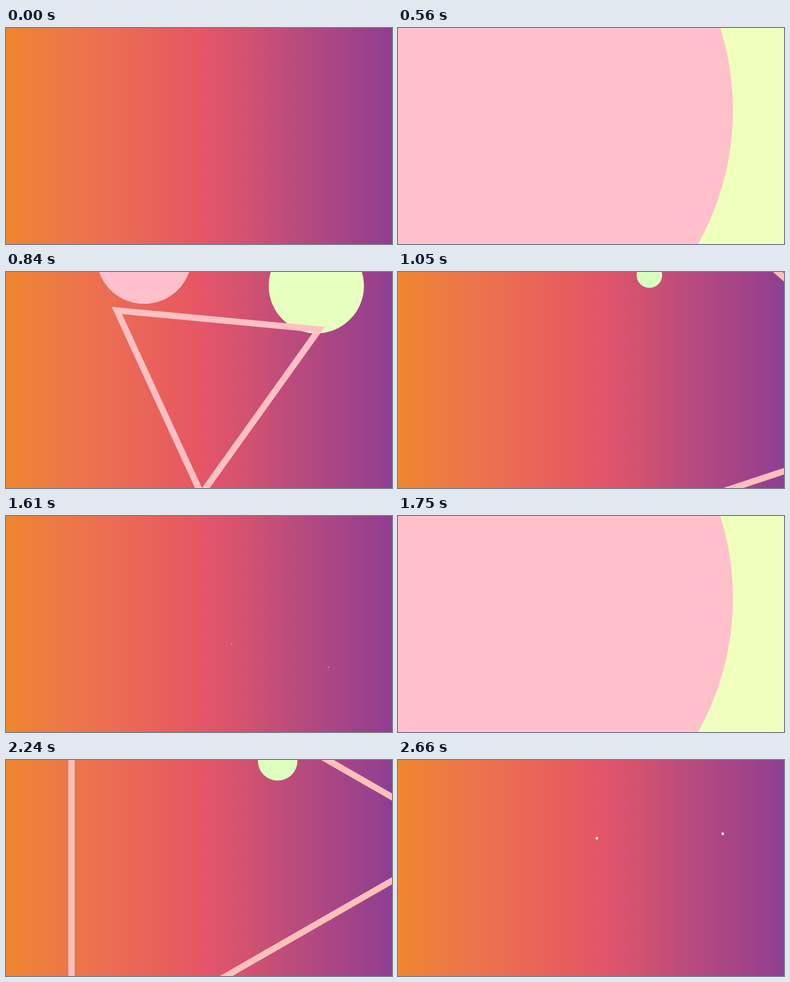
An HTML page with a canvas for the animation above (2730 ms loop, 640x360 px).

```html
<!DOCTYPE html>
<html lang="en">
<head>
<meta charset="utf-8">
<title>Burst</title>
<style>
  html, body { margin: 0; width: 100%; height: 100%; overflow: hidden; }
  canvas { display: block; width: 100vw; height: 100vh; }
</style>
</head>
<body>
<canvas id="stage" width="640" height="360"></canvas>
<script>
const W = 640, H = 360, LOOP = 2730, STEP = 70;
const ctx = document.getElementById('stage').getContext('2d');
const RAD = Math.PI / 180;

const backdrop = ctx.createLinearGradient(0, 0, W, 0);
[
  [0, 240, 134, 46], [80, 237, 122, 68], [180, 235, 108, 84],
  [290, 231, 91, 96], [330, 228, 85, 104], [400, 210, 82, 112],
  [480, 186, 75, 126], [560, 165, 68, 134], [640, 143, 62, 147]
].forEach(([x, ...c]) => backdrop.addColorStop(x / W, `rgb(${c})`));

const clamp = (v, lo, hi) => Math.min(hi, Math.max(lo, v));

function mix(a, b, k) {
  k = clamp(k, 0, 1);
  return `rgb(${a.map((v, i) => Math.round(v + (b[i] - v) * k))})`;
}

// Quadratic through values at 0, 280 and 350 ms.
function curve(t, a, b, c) {
  const s1 = (b - a) / 280, s2 = (c - b) / 70;
  return a + s1 * t + (s2 - s1) / 350 * t * (t - 280);
}

function polar(x, y, r, deg) {
  return [x + r * Math.cos(deg * RAD), y + r * Math.sin(deg * RAD)];
}

function disc([x, y], r, color) {
  ctx.beginPath();
  ctx.arc(x, y, r, 0, 2 * Math.PI);
  ctx.fillStyle = color;
  ctx.fill();
}

function triangle([x, y], r, deg, color) {
  ctx.beginPath();
  for (let i = 0; i < 3; i++) ctx.lineTo(...polar(x, y, r, deg + i * 120));
  ctx.closePath();
  ctx.lineWidth = 10.5;
  ctx.lineJoin = 'miter';
  ctx.strokeStyle = color;
  ctx.stroke();
}

// Discs shrink along opposite orbits while the triangle spins outwards.
function burst(t) {
  const r = Math.max(0.75, 190 * Math.exp(-0.00627 * t));
  const lime = mix([239, 255, 188], [216, 254, 192], t / 350);
  const pink = mix([255, 192, 203], [255, 222, 222], (t - 300) / 400);

  const limeAngle = -20.3 - 0.25 * t + 1.9e-5 * t * t;
  disc(polar(448, 118, 115 + 5 * clamp(t / 910, 0, 1), limeAngle), r, lime);

  const pinkAngle = -140.8 + 0.1966 * t - 2.39e-5 * t * t;
  disc(polar(320, 181, 226, pinkAngle), r, pink);

  if (t > 350) return;
  const drift = Math.exp(curve(t, 2.61, 3.89, 4.38));
  const center = polar(320, 180, drift, curve(t, 54, -83, -125));
  const size = Math.exp(curve(t, 4.437, 6.075, 6.467));
  const tint = mix([255, 192, 203], [255, 192, 186], t / 280);
  triangle(center, size, curve(t, -51, 0, 11.6), tint);
}

function draw(time) {
  const t = Math.floor((time % LOOP + 0.01) / STEP) * STEP;
  ctx.fillStyle = backdrop;
  ctx.fillRect(0, 0, W, H);
  if (t >= 1750) burst(Math.max(-140, t - 1960));
  else if (t >= 560) burst(Math.min(910, t - 700));
}

const start = performance.now();
function tick() {
  draw(performance.now() - start);
  requestAnimationFrame(tick);
}
tick();
</script>
</body>
</html>
```
